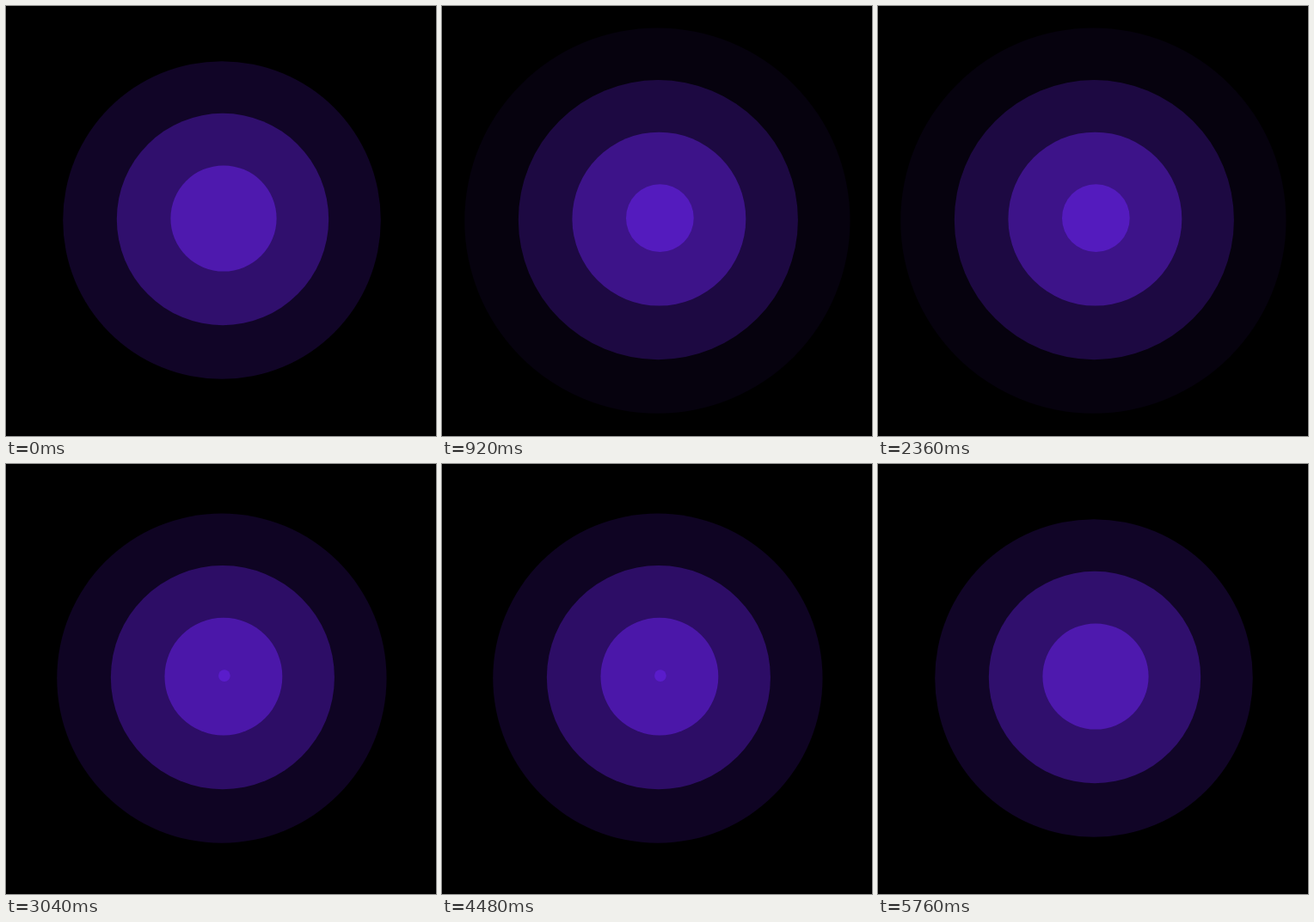
Animation, 500 px wide and 500 px high, one loop 5800 ms. Source, as an HTML page:

```html
<!DOCTYPE html>
<html lang="en">
<head>
<meta charset="utf-8">
<title>Ripple</title>
<style>
  html, body { margin: 0; width: 100%; height: 100%; overflow: hidden; background: #000; }
  svg { display: block; width: 100%; height: 100%; }
</style>
</head>
<body>
<svg id="stage" viewBox="0 0 500 500"></svg>
<script>
const LOOP = 5800, STEP = 40, WAVE = 1440, RINGS = 4;
const MAX_RADIUS = 246.4, DRIFT = 4;
const stage = document.getElementById('stage');

// Largest ring first, so smaller ones lie on top.
const rings = Array.from({ length: RINGS }, () => {
  const ring = document.createElementNS('http://www.w3.org/2000/svg', 'circle');
  ring.setAttribute('fill', '#5b1dcc');
  return stage.appendChild(ring);
});

function draw(time) {
  const t = Math.floor((time % LOOP) / STEP) * STEP;
  const phase = (t % WAVE) / WAVE;
  rings.forEach((ring, i) => {
    const p = (phase + RINGS - 1 - i) / RINGS;
    ring.setAttribute('cx', 250 + DRIFT * (1 - p));
    ring.setAttribute('cy', 250 - DRIFT * (1 - p));
    ring.setAttribute('r', MAX_RADIUS * p);
    ring.setAttribute('fill-opacity', (1 - p) * (1 - 0.3 * p));
  });
}

const start = performance.now();
function tick() {
  draw(performance.now() - start);
  requestAnimationFrame(tick);
}
tick();
</script>
</body>
</html>
```
